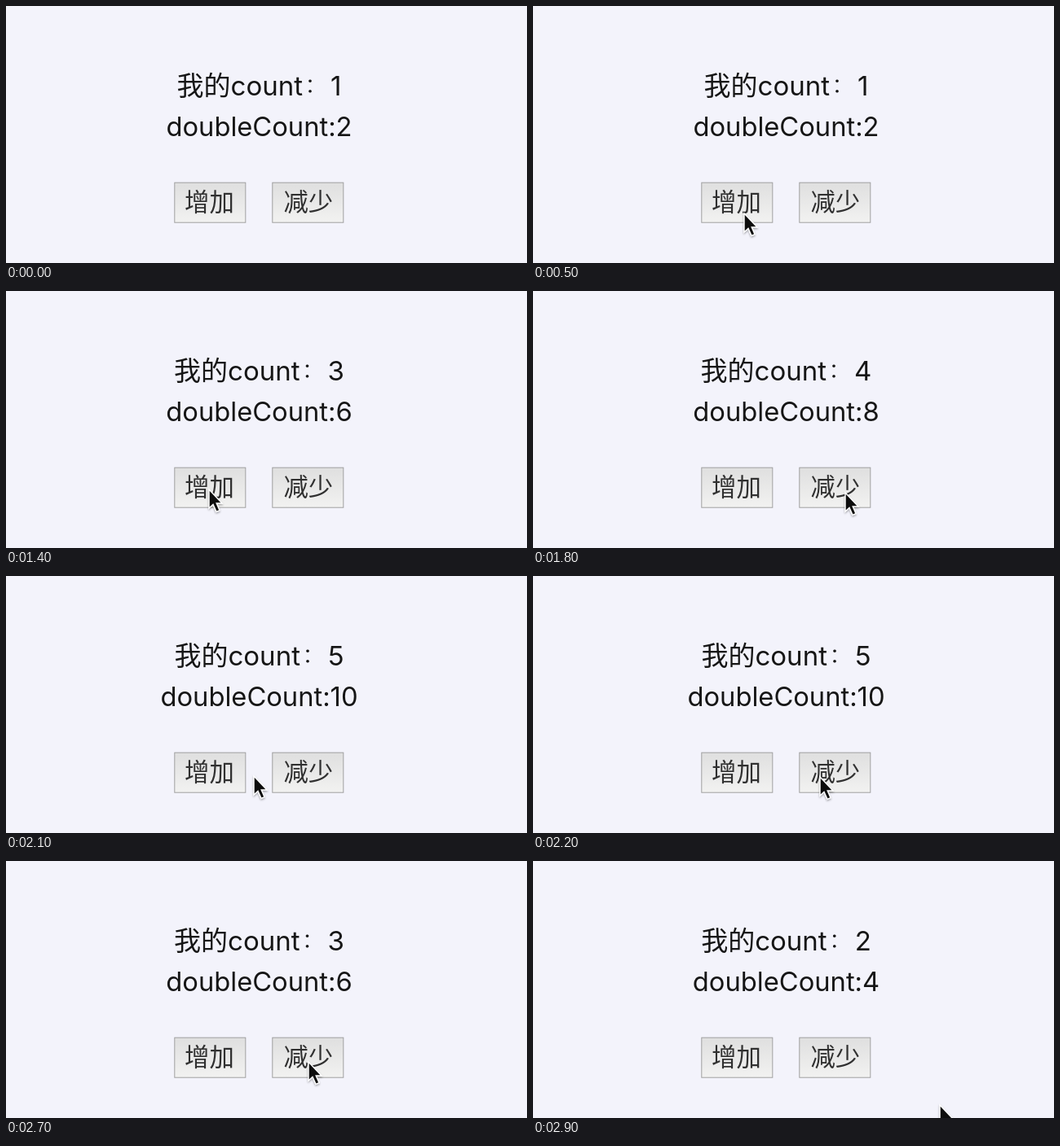
Write an HTML page that moves like this. It is 639 by 316 pixels and loops after 3 s.

```html
<!DOCTYPE html>
<html lang="zh-CN">
<head>
<meta charset="utf-8">
<title>count</title>
<style>
  html, body { margin: 0; width: 100%; height: 100%; overflow: hidden; background: #f3f3fb; }
  svg { display: block; width: 639px; height: 316px; overflow: hidden; }
  text { font-family: Inter, "Noto Sans CJK SC", sans-serif; text-anchor: middle; }
  .reel text { font-size: 33px; fill: #161616; }
  .reel .double { font-size: 32.7px; }
  .colon { font-size: 24px; baseline-shift: 3.8px; }
  .label { font-size: 30.4px; fill: #303030; }
  .box { fill: url(#face); stroke: #a0a0a0; }

  .reel, .cursor, .press { animation: 3s step-end infinite; }
  .reel { animation-name: count; }
  .cursor { animation-name: move; }
  .press { animation-name: press; visibility: hidden; }

  /* each value of the counter sits one stage height below the last */
  @keyframes count {
    0% { transform: translateY(0); }
    33.33% { transform: translateY(-316px); }
    43.33% { transform: translateY(-632px); }
    50% { transform: translateY(-948px); }
    66.66% { transform: translateY(-1264px); }
    76.66% { transform: translateY(-948px); }
    86.66% { transform: translateY(-632px); }
    93.33%, 100% { transform: translateY(-316px); }
  }
  @keyframes move {
    0% { transform: translate(-60px, 255px); }
    16.66% { transform: translate(259px, 255px); }
    20% { transform: translate(249px, 244px); }
    56.66% { transform: translate(330px, 247px); }
    60% { transform: translate(383px, 248px); }
    63.33% { transform: translate(300px, 246px); }
    66.66% { transform: translate(252px, 245px); }
    70% { transform: translate(304px, 246px); }
    73.33% { transform: translate(352px, 247px); }
    76.66% { transform: translate(362px, 247px); }
    80% { transform: translate(368px, 247px); }
    83.33% { transform: translate(371px, 247px); }
    96.66%, 100% { transform: translate(499px, 300px); }
  }
  @keyframes press {
    0% { visibility: hidden; }
    83.33% { visibility: visible; }
    86.66%, 100% { visibility: hidden; }
  }
</style>
</head>
<body>
<svg viewBox="0 0 639 316">
  <defs>
    <linearGradient id="face" x2="0" y2="1">
      <stop stop-color="#dfdfdf"/>
      <stop offset="1" stop-color="#f2f2f1"/>
    </linearGradient>
    <linearGradient id="down" x2="0" y2="1">
      <stop stop-color="#a0a0a1"/>
      <stop offset="1" stop-color="#b2b2b3"/>
    </linearGradient>
    <filter id="shade" x="-50%" y="-50%" width="200%" height="200%">
      <feDropShadow dx="0" dy="1.5" stdDeviation="1.3" flood-opacity=".35"/>
    </filter>
  </defs>

  <g class="reel">
    <g>
      <text x="310.5" y="110">我的count<tspan class="colon" dx="3">：</tspan><tspan dx="7">1</tspan></text>
      <text class="double" x="310.5" y="160">doubleCount:2</text>
    </g>
    <g transform="translate(0 316)">
      <text x="310.5" y="110">我的count<tspan class="colon" dx="3">：</tspan><tspan dx="7">2</tspan></text>
      <text class="double" x="310.5" y="160">doubleCount:4</text>
    </g>
    <g transform="translate(0 632)">
      <text x="310.5" y="110">我的count<tspan class="colon" dx="3">：</tspan><tspan dx="7">3</tspan></text>
      <text class="double" x="310.5" y="160">doubleCount:6</text>
    </g>
    <g transform="translate(0 948)">
      <text x="310.5" y="110">我的count<tspan class="colon" dx="3">：</tspan><tspan dx="7">4</tspan></text>
      <text class="double" x="310.5" y="160">doubleCount:8</text>
    </g>
    <g transform="translate(0 1264)">
      <text x="310.5" y="110">我的count<tspan class="colon" dx="3">：</tspan><tspan dx="7">5</tspan></text>
      <text class="double" x="310.5" y="160">doubleCount:10</text>
    </g>
  </g>

  <rect class="box" x="206.8" y="217.2" width="87" height="49"/>
  <rect class="box" x="326.8" y="217.2" width="87" height="49"/>
  <rect class="press" x="326" y="217" width="88" height="50" fill="url(#down)"/>
  <text class="label" x="249.5" y="251.8">增加</text>
  <text class="label" x="370.8" y="251.8">减少</text>

  <g class="press" fill="none">
    <circle cx="370.5" cy="248.5" r="33.5" stroke="#fff" stroke-width="8"/>
    <circle cx="370.5" cy="248.5" r="34" stroke="#0a0a0a" stroke-width="4.6"/>
  </g>
  <g class="cursor">
    <path d="M0 0V23L5 18.4L9 27.4L13 25.7L9.2 17H16Z" fill="#111" stroke="#fff" stroke-width="1.4" filter="url(#shade)"/>
  </g>
</svg>
</body>
</html>
```
